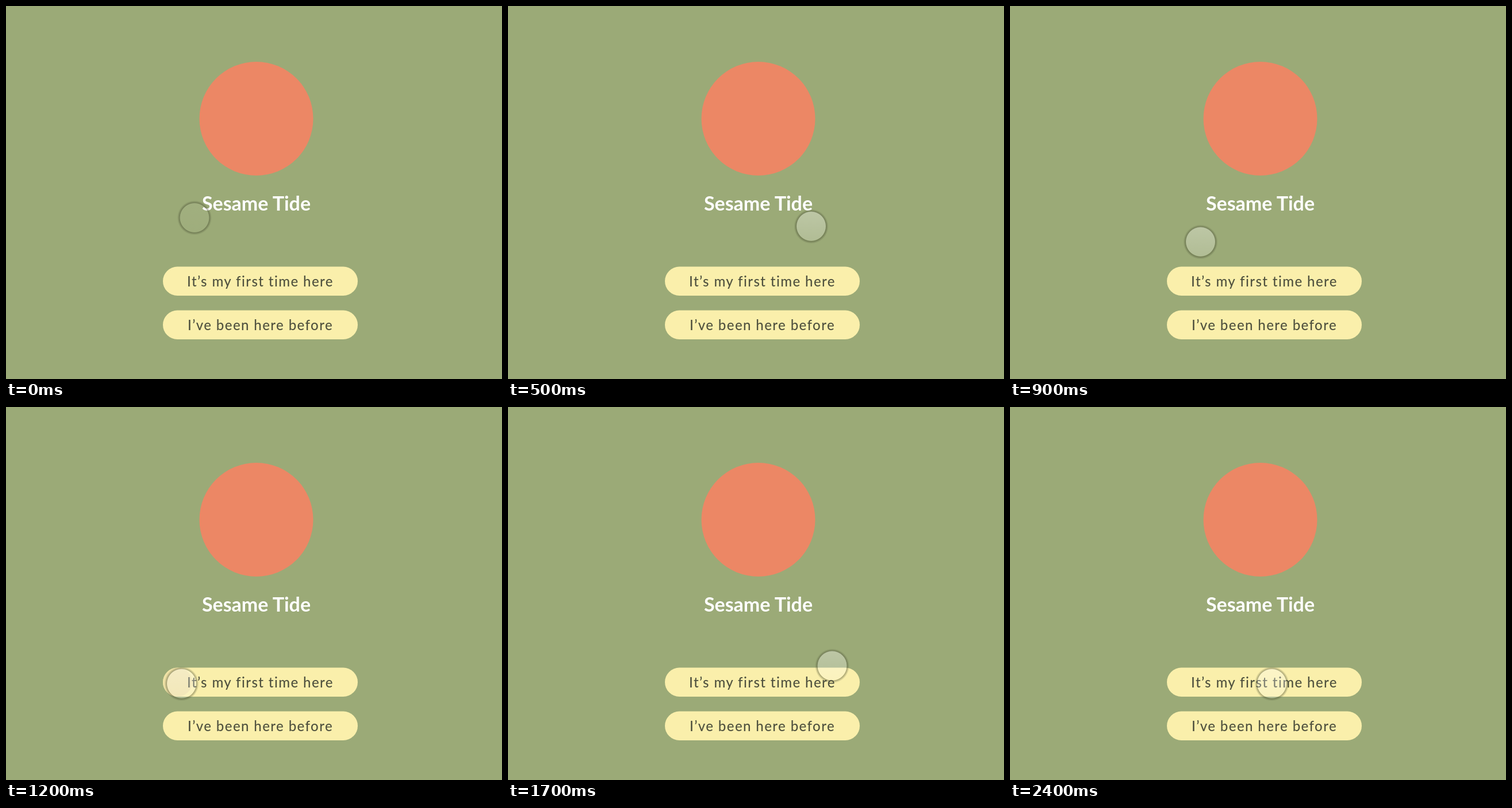
Write an HTML page that moves like this. It is 863x649 px and loops after 2500 ms.

```html
<!DOCTYPE html>
<html lang="en">
<head>
<meta charset="utf-8">
<title>Welcome screen</title>
<style>
  html, body { margin: 0; width: 100%; height: 100%; overflow: hidden; background: #9baa77; }
  svg { display: block; width: 863px; height: 649px; }
  text { font-family: Lato, "Open Sans", sans-serif; text-anchor: middle; }
  .title { font-size: 34px; font-weight: 700; fill: #fff; }
  .label { font-size: 24px; font-weight: 500; letter-spacing: 1.42px; fill: #50523f; }
  .pill { fill: #faefab; }
</style>
</head>
<body>
<svg viewBox="0 0 863 649">
  <defs>
    <linearGradient id="glass" x1="0" y1="0" x2="0" y2="1">
      <stop offset="0" stop-color="#fff" stop-opacity=".34"/>
      <stop offset="1" stop-color="#fff" stop-opacity=".22"/>
    </linearGradient>
    <!-- Shadow only outside the disc, so the glass stays clear -->
    <radialGradient id="shade">
      <stop offset=".83" stop-color="#3c4128" stop-opacity="0"/>
      <stop offset=".86" stop-color="#3c4128" stop-opacity=".42"/>
      <stop offset="1" stop-color="#3c4128" stop-opacity="0"/>
    </radialGradient>
  </defs>
  <rect width="863" height="649" fill="#9baa77"/>
  <circle cx="435.5" cy="196" r="99" fill="#ec8765"/>
  <text class="title" x="435.5" y="356">Sesame Tide</text>

  <rect class="pill" x="273" y="453.5" width="339" height="50.5" rx="25.25"/>
  <circle id="press" cx="298.5" cy="478.75" r="25.25" fill="#efe1a5"/>
  <text class="label" x="442.5" y="488">It’s my first time here</text>

  <rect class="pill" x="273" y="529.5" width="339" height="50.5" rx="25.25"/>
  <text class="label" x="442.5" y="564">I’ve been here before</text>

  <g id="cursor">
    <circle cy=".5" r="30" fill="url(#shade)"/>
    <circle id="fill" r="25.5" fill="url(#glass)"/>
  </g>
</svg>
<script>
  const STEP = 100, LOOP = 2500, PRESS_STEP = 12;
  // Key points of the cursor's path: step, x, y.
  const keys = [
    [0, 328, 368], [4, 572, 377], [5, 527.5, 383], [6, 449, 390], [9, 331.5, 410],
    [12, 305.5, 481], [15, 462.5, 436], [17, 564, 450], [19, 455.5, 481]
  ];
  const $ = id => document.getElementById(id);
  const cursor = $("cursor"), fill = $("fill"), press = $("press");

  // Speed at a key point; zero where the motion turns back or stops.
  function slope(i, axis) {
    const prev = keys[i - 1], key = keys[i], next = keys[i + 1];
    if (!next) return 0;
    if (!prev) return (next[axis] - key[axis]) / (next[0] - key[0]);
    const turns = (key[axis] - prev[axis]) * (next[axis] - key[axis]) <= 0;
    return turns ? 0 : (next[axis] - prev[axis]) / (next[0] - prev[0]);
  }

  // Smooth cubic curve through the key points.
  function position(step, axis) {
    const last = keys.length - 1;
    if (step >= keys[last][0]) return keys[last][axis];
    const i = keys.findIndex(key => key[0] > step) - 1;
    const a = keys[i], b = keys[i + 1], span = b[0] - a[0];
    const u = (step - a[0]) / span, v = 1 - u;
    return a[axis] * v * v * (1 + 2 * u) + b[axis] * u * u * (1 + 2 * v)
      + span * u * v * (v * slope(i, axis) - u * slope(i + 1, axis));
  }

  function draw(now) {
    const step = Math.floor(now % LOOP / STEP);
    cursor.setAttribute("transform", `translate(${position(step, 1)} ${position(step, 2)})`);
    fill.setAttribute("opacity", Math.min(1, 0.18 + step * 0.4));
    press.setAttribute("opacity", step === PRESS_STEP ? 1 : 0);
  }

  const start = performance.now();
  function tick() {
    draw(performance.now() - start);
    requestAnimationFrame(tick);
  }
  tick();
</script>
</body>
</html>
```
